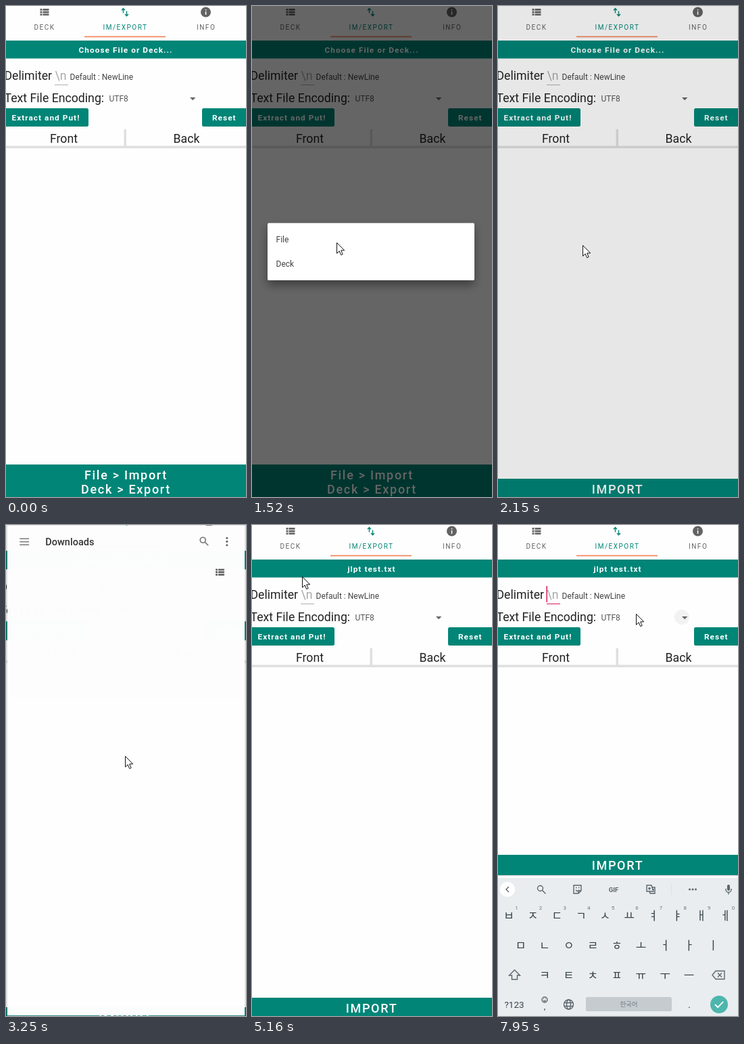
An HTML page for the animation above (8000 ms loop, 355x725 px).

```html
<!DOCTYPE html>
<html lang="en">
<head>
<meta charset="utf-8">
<title>Import a deck</title>
<style>
html, body { margin: 0; width: 100%; height: 100%; overflow: hidden; background: #fff; }
svg { display: block; width: 355px; height: 725px; font-family: Roboto, sans-serif; }
.tab { font-size: 10px; letter-spacing: 1.5px; fill: #636363; }
.btn { font-size: 11.8px; font-weight: 700; letter-spacing: 1.05px; fill: #fff; }
.big { font-size: 17.7px; fill: #222; }
.small { font-size: 12px; fill: #444; }
.bar { font-size: 18px; font-weight: 500; letter-spacing: 1.7px; fill: #fff; }
.mid { text-anchor: middle; }
.teal { fill: #008577; }
.key { font: 17px "Noto Sans CJK KR", "Noto Sans CJK", sans-serif; fill: #37434a; text-anchor: middle; }
.num { font-size: 8px; fill: #6b757b; text-anchor: middle; }
.line { fill: none; stroke: #5c666c; stroke-width: 1.4; }
.origin { transform-origin: 177.5px 362.5px; }
</style>
</head>
<body>
<svg viewBox="0 0 355 725">
  <defs>
    <path id="list" d="M0 0h3v2.7h-3zM4 0h9v2.7h-9zM0 3.7h3v2.7h-3zM4 3.7h9v2.7h-9zM0 7.4h3v2.7h-3zM4 7.4h9v2.7h-9z"/>
    <filter id="shadow" x="-20%" y="-30%" width="140%" height="180%">
      <feDropShadow dx="0" dy="7" stdDeviation="7" flood-opacity=".4"/>
    </filter>
  </defs>
  <rect width="355" height="725" fill="#fefefe"/>

  <g id="app" class="origin">
    <use href="#list" x="50.5" y="4" fill="#636363"/>
    <text class="tab" x="41.5" y="35">DECK</text>
    <path d="M173.500 10.500V4M171 6.200l2.500-2.700 2.500 2.700M178.500 7.500v6.500M176 12l2.500 2.700 2.500-2.700" fill="none" stroke="#008577" stroke-width="1.400"/>
    <text class="tab teal" x="143.500" y="35" style="fill:#008577">IM/EXPORT</text>
    <circle cx="295.500" cy="9" r="7.500" fill="#636363"/>
    <path d="M294.800 5h1.500v1.600h-1.500zM294.800 8h1.500v5h-1.500z" fill="#fff"/>
    <text class="tab" x="282" y="35">INFO</text>
    <rect x="116" y="44.500" width="120" height="1.700" fill="#f2855c"/>

    <rect class="teal" x="-4" y="51" width="363" height="26.500" rx="2"/>
    <text id="chosen" class="btn mid" x="177" y="69"></text>

    <text class="big" x="-2.500" y="109">Delimiter</text>
    <text class="big" x="72.500" y="109" style="fill:#aaa">\n</text>
    <rect id="under" x="72" y="116" width="20" height="1"/>
    <rect id="caret" x="71.500" y="90" width="1.500" height="24" fill="#d81b60"/>
    <text class="small" x="94.500" y="108.700">Default : NewLine</text>
    <text class="big" x="-2.500" y="141.500">Text File Encoding:</text>
    <text class="small" x="152.500" y="141.300" style="fill:#555">UTF8</text>
    <circle id="ripple" cx="272" cy="136" r="11" fill="#f2f2f2"/>
    <path d="M272 135h8.400l-4.200 4.200z" fill="#666"/>

    <rect class="teal" x="-4" y="151" width="126" height="27" rx="2.500"/>
    <text class="btn" x="8.500" y="169">Extract and Put!</text>
    <rect class="teal" x="290" y="151" width="69" height="27" rx="2.500"/>
    <text class="btn" x="305" y="169">Reset</text>

    <text class="big mid" x="85.500" y="201.500">Front</text>
    <text class="big mid" x="267" y="201.500">Back</text>
    <path d="M174.500 182h3.500v25h-3.500zM-10 206.500h375v3.500h-375z" fill="#dfdfdf"/>

    <g id="both">
      <rect class="teal" x="-4" y="677" width="363" height="60" rx="2"/>
      <text class="bar mid" x="177.500" y="699">File &gt; Import</text>
      <text class="bar mid" x="177.500" y="720">Deck &gt; Export</text>
    </g>
    <g id="import">
      <rect x="-4" y="699" width="363" height="30.500" rx="2.500" fill="#000" opacity=".15"/>
      <rect class="teal" x="-4" y="698" width="363" height="30" rx="2.500"/>
      <text class="bar mid" x="177" y="720">IMPORT</text>
    </g>
  </g>

  <rect id="scrim" width="355" height="725"/>
  <g id="dialog">
    <rect x="23" y="320.500" width="306" height="84.500" rx="2" fill="#fff" filter="url(#shadow)"/>
    <text class="small" x="35.500" y="349.300">File</text>
    <text class="small" x="35.500" y="385.300">Deck</text>
  </g>

  <g id="picker" class="origin">
    <rect width="355" height="725" fill="#fefefe"/>
    <path d="M18.500 19.500h14M18.500 24h14M18.500 28.500h14" stroke="#7a7a7a" stroke-width="1.500"/>
    <text x="57" y="29" font-size="14.700" font-weight="500" fill="#333">Downloads</text>
    <g fill="none" stroke="#757575" stroke-width="1.700">
      <circle cx="292.500" cy="21.500" r="4"/><path d="M295.500 24.500l5 5"/>
    </g>
    <g fill="#666">
      <circle cx="328.500" cy="18.500" r="1.600"/><circle cx="328.500" cy="23.700" r="1.600"/><circle cx="328.500" cy="29" r="1.600"/>
      <use href="#list" x="311.500" y="64"/>
    </g>
    <g id="files">
      <rect x="12.500" y="96.500" width="160" height="150" rx="3" fill="#fff" stroke="#ddd"/>
      <path d="M80 138h17l9 9v27h-26z" fill="#9aa0a6"/>
      <path d="M13 212.500h159" stroke="#e5e5e5"/>
      <text class="small" x="26" y="234">jlpt test.txt</text>
    </g>
  </g>

  <g id="keyboard">
    <rect y="521" width="355" height="210" fill="#e9edf0"/>
    <circle cx="14" cy="538" r="11" fill="#fff"/>
    <path class="line" d="M16 534l-4 4 4 4"/>
    <g class="line">
      <circle cx="62.500" cy="536.500" r="4"/><path d="M65.500 539.500l5 5"/>
      <path d="M112 532h11v8l-4 4h-7zM123 540h-4v4M115 539q2.500 3 5 0M115 535.500h1.500M119 535.500h1.500"/>
      <path d="M220 532h7l3 9h-10zM227 535h5v9h-7l-1-3M222 536.500h4M224 535v4M228 538h3"/>
      <path d="M337 537v1.500a4 4 0 0 0 8 0V537M341 543v2.500"/>
    </g>
    <rect x="339" y="531" width="4" height="9" rx="2" fill="#5c666c"/>
    <text class="mid" x="171" y="541.500" font-size="9.500" font-weight="700" fill="#5c666c">GIF</text>
    <path d="M256.500 530v16" stroke="#dce1e4"/>
    <g fill="#5c666c"><circle cx="283.500" cy="538" r="1.500"/><circle cx="288" cy="538" r="1.500"/><circle cx="292.500" cy="538" r="1.500"/></g>
    <g id="keys"></g>
    <path class="line" d="M24.500 657l-8 8h4v6h8v-6h4z"/>
    <path class="line" d="M322 658.500h13v12h-13l-5-6zM325 661.500l6 6M331 661.500l-6 6"/>
    <text class="mid" x="24" y="712.500" font-size="13.500" fill="#37434a">?123</text>
    <g class="line" stroke-width="1">
      <circle cx="69" cy="701" r="4"/><path d="M67 702q2 2 4 0M67.300 699.500h.8M70 699.500h.8"/>
      <circle cx="104.500" cy="708" r="7"/><ellipse cx="104.500" cy="708" rx="3" ry="7"/><path d="M98 705.500h13M98 710.500h13"/>
    </g>
    <text class="mid" x="69" y="715" font-size="13" fill="#37434a">,</text>
    <rect x="130" y="697" width="127" height="21" rx="2.500" fill="#c5cbcf"/>
    <text class="key" x="193.500" y="711" style="font-size:9.500px;fill:#737d83">한국어</text>
    <text class="mid" x="283" y="713" font-size="15" fill="#37434a">.</text>
    <circle cx="327" cy="708" r="13" fill="#4db6ac"/>
    <path d="M321 708l4.200 4.200 8-8.400" fill="none" stroke="#fff" stroke-width="1.800"/>
  </g>

  <g id="cursor">
    <circle id="click" r="12" fill="#ff0" opacity=".5"/>
    <path d="M.5.5V16.300L4.200 12.900 6.700 18.700 9.200 17.600 6.700 11.900H11.700Z" fill="#fff" stroke="#111" stroke-width="1"/>
  </g>
</svg>

<script>
const LOOP = 8000;
const $ = id => document.getElementById(id);

// Screen refreshes: first time, last time, count.
const beats = [
  [0, 0, 1], [150, 610, 7], [760, 1520, 11], [1760, 1840, 2], [2150, 2150, 1], [2700, 2700, 1],
  [3190, 3490, 6], [3720, 4180, 7], [4670, 5160, 8], [5330, 5790, 7], [5940, 6650, 10],
  [6810, 7030, 5], [7110, 7190, 2], [7340, 7340, 1], [7490, 7950, 7]
];
const path = [
  [150, 293, 589], [533, 232, 57], [1000, 232, 57], [1440, 125, 349], [1760, 125, 349],
  [1840, 125, 353], [3189, 125, 353], [3190, 180, 330], [3250, 176, 341], [3430, 173, 353],
  [3650, 173, 353], [4100, 99, 175], [4740, 99, 175], [5160, 74, 76], [5260, 74, 76],
  [5640, 86, 107], [6150, 86, 107], [6650, 156, 273], [7420, 156, 273], [7950, 204, 131]
];
const clicks = [[533, 760], [1760, 2000], [4100, 4180], [5640, 5720], [6900, 7110]];
const scrim = [[800, 0], [1000, .6], [1700, .6], [1840, .35], [2150, .09], [2700, 0]];
const dialog = [[800, 0], [1000, 1], [1760, 1], [1840, .4], [1900, 0]];
const pickerFade = [[3130, 0], [3190, .7], [3250, .99], [3310, 1], [4670, 1], [4880, 0]];
const pickerZoom = [[3130, .92], [3190, .96], [3250, .989], [3310, 1], [4670, 1], [4880, .95]];
const appZoom = [[3130, 1], [3250, 1.0417], [4670, 1.0417], [4880, 1]];
const appDim = [[3130, 0], [3250, .12], [4670, .12], [4880, 0]];
const keyDrop = [[5990, 204], [6300, 0], [6810, 0], [6920, 204], [7030, 204], [7110, 80], [7190, 0]];

function snap(t) {
  const [a, b, n] = beats.filter(k => k[0] <= t).pop();
  if (n < 2) return a;
  const step = (b - a) / (n - 1);
  return a + step * Math.min(n - 1, Math.floor((t - a + .5) / step));
}

function tween(keys, t, col = 1, ease = u => u) {
  const i = keys.findIndex(k => k[0] > t);
  if (i < 0) return keys[keys.length - 1][col];
  if (i === 0) return keys[0][col];
  const p = keys[i - 1], q = keys[i];
  return p[col] + (q[col] - p[col]) * ease((t - p[0]) / (q[0] - p[0]));
}

const smooth = u => u * u * (3 - 2 * u);
const show = (id, on) => $(id).style.display = on ? "" : "none";
const zoom = (id, x, y) => $(id).style.transform = `scale(${x}, ${y})`;

function row(letters, x, y, numbered) {
  return [...letters].map((c, i) => {
    const cx = x + i * 35.6;
    const num = numbered ? `<text class="num" x="${cx + 11.500}" y="568">${(i + 1) % 10}</text>` : "";
    return `<text class="key" x="${cx}" y="${y}">${c}</text>${num}`;
  }).join("");
}
$("keys").innerHTML = row("ㅂㅈㄷㄱㅅㅛㅕㅑㅐㅔ", 16, 583, true)
  + row("ㅁㄴㅇㄹㅎㅗㅓㅏㅣ", 33.5, 627) + row("ㅋㅌㅊㅍㅠㅜㅡ", 69, 671);

function render(now) {
  const t = snap(now);
  const focused = t >= 5700;

  $("chosen").textContent = t < 4730 ? "Choose File or Deck..." : "jlpt test.txt";
  $("under").setAttribute("fill", focused ? "#d81b60" : "#b0b0b0");
  show("caret", focused && (t - 5840 + LOOP) % 1000 < 500);
  show("ripple", t >= 7190);
  show("both", t < 2150);
  show("import", t >= 2150);
  $("import").setAttribute("transform", `translate(0 ${t >= 6000 ? -211 : 0})`);

  const z = tween(appZoom, t), p = tween(pickerZoom, t);
  zoom("app", z, z);
  zoom("picker", p, 1 - (1 - p) / 5);
  $("picker").style.opacity = tween(pickerFade, t);
  show("files", t >= 3400);
  $("scrim").style.opacity = tween(scrim, t) + tween(appDim, t);
  $("dialog").style.opacity = tween(dialog, t);

  const drop = tween(keyDrop, t);
  show("keyboard", drop < 204);
  $("keyboard").setAttribute("transform", `translate(0 ${drop})`);

  show("cursor", t >= 150);
  show("click", clicks.some(([a, b]) => t >= a && t < b));
  $("cursor").setAttribute("transform", `translate(${tween(path, t, 1, smooth)} ${tween(path, t, 2, smooth)})`);
}

function tick() {
  render(performance.now() % LOOP);
  requestAnimationFrame(tick);
}
tick();
</script>
</body>
</html>
```
